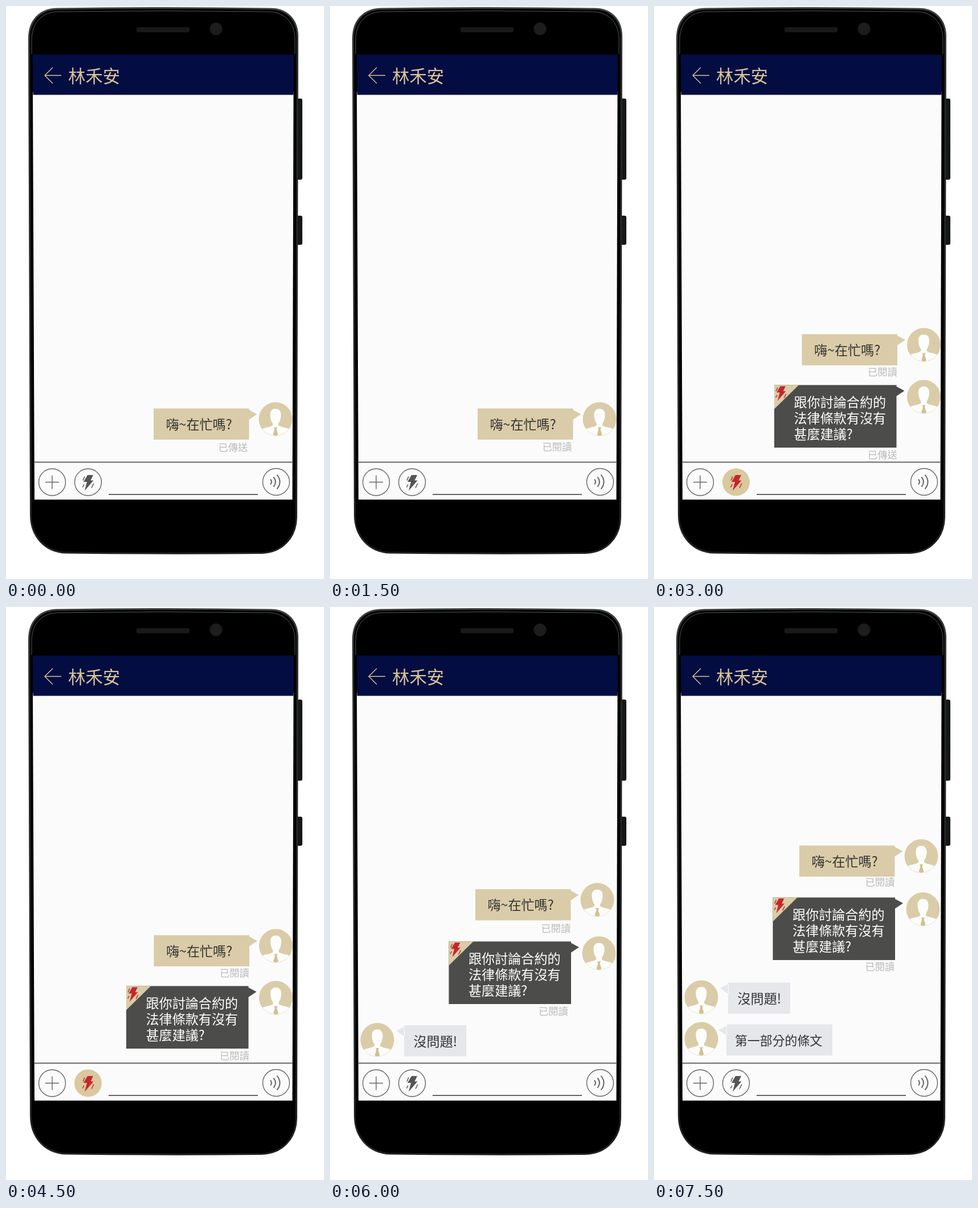
Animation of 558 by 1003 pixels, one loop 8000 ms. Source, as an HTML page:

```html
<!DOCTYPE html>
<html lang="zh-Hant">
<head>
<meta charset="utf-8">
<title>Chat</title>
<style>
  html, body { margin: 0; width: 100%; height: 100%; overflow: hidden; background: #fff; }
  svg { display: block; width: 558px; height: 1003px; }
  text { font-family: "Noto Sans CJK TC", "Noto Sans CJK", "Noto Sans CJK JP", sans-serif; font-size: 23.1px; fill: #333; }
  .title { font-size: 30.4px; fill: #d8c394; }
  .status { font-size: 17.3px; fill: #b9b9b9; }
  .light { fill: #fff; }
  .line { fill: none; stroke: #666; stroke-width: 1.4; }
</style>
</head>
<body>
<svg viewBox="0 0 558 1003">
  <defs>
    <linearGradient id="rim" x2="0" y2="1">
      <stop offset="0" stop-color="#3c4040"/>
      <stop offset=".12" stop-color="#272a2a"/>
      <stop offset="1" stop-color="#202222"/>
    </linearGradient>
    <clipPath id="round"><circle r="29"/></clipPath>
    <g id="avatar">
      <circle r="29.5" fill="#dacca8"/>
      <g clip-path="url(#round)">
        <path fill="#fdfdfc" d="M0-18C7-18 10-13 9.500-6C9 1 7 5 5 8V11C8 14 20 15 25 18L31 31H-31L-25 18C-20 15-8 14-5 11V8C-7 5-9 1-9.500-6C-10-13-7-18 0-18Z"/>
        <path fill="#d3c090" d="M-3 14.500H3L1.600 18.500L4.500 27L0 31L-4.500 27L-1.600 18.500Z"/>
      </g>
    </g>
    <g id="bolt">
      <path d="M-1-12.500H9L4.500-3H9.500L-6 15L-2-.5H-8Z"/>
      <path fill="none" stroke="currentColor" stroke-width="1.5" d="M-6-10L-9-3M10 2L6 10M-7 4L-9.500 9"/>
    </g>
  </defs>

  <path fill="#161717" d="M508 162H517Q520 162 520 165V301Q520 304 517 304H508ZM508 367H517Q520 367 520 370V415Q520 418 517 418H508Z"/>
  <path fill="#000" stroke="url(#rim)" stroke-width="3" d="M88 5Q276 2 464 5C492 5 511 23 511.500 52L509.500 895C509 931 484 957 448 957.500Q276 959 106 957C68 956 44 928 43.500 892L40.500 58C40 26 59 6 88 5Z"/>
  <path fill="none" stroke="#555959" d="M45 84V60C45 30 62 11 90 10Q276 7 462 10C489 11 506 29 507 56V84"/>
  <rect x="229" y="37" width="93" height="9" rx="3" fill="#191919"/>
  <circle cx="368.500" cy="40" r="11" fill="#1d1d1d"/>

  <path fill="#fbfbfb" d="M47 150H504.500L502.500 864H50Z"/>
  <path fill="#030d42" d="M47 85H504.500V155.500H47.500Z"/>
  <path class="line" style="stroke:#d8c394" d="M97 121.500H68M82 107.500L68 121.500L82 135.500"/>
  <text class="title" x="109" y="133.500">林禾安</text>

  <g id="chat"></g>

  <path class="line" style="stroke-width:2" d="M50 798.500H502.500M180 855H442"/>
  <g class="line">
    <circle cx="81" cy="833.500" r="23.500"/>
    <path d="M69 833.500H93M81 821.500V845.500"/>
    <circle cx="474" cy="833" r="23.500"/>
    <path stroke-width="2" d="M464 828.500Q468 833 464 837.500M469.500 824.500Q476.500 833 469.500 841.500M475.500 820.500Q485.500 833 475.500 845.500"/>
  </g>
  <g id="flash"></g>
</svg>
<script>
const tan = '#dacca8', dark = '#4c4c4a', grey = '#e6e7eb', red = '#c4272b';
const SENT = '已傳送', READ = '已閱讀';

const avatar = (x, y) => `<use href="#avatar" x="${x}" y="${y}"/>`;
const text = (x, y, s, attrs = '') => `<text x="${x}" y="${y}" ${attrs}>${s}</text>`;
const status = (x, y, s) => text(x, y + 6.6, s, 'class="status"');
const bolt = (x, y, color, scale = 1) =>
  `<use href="#bolt" transform="translate(${x} ${y}) scale(${scale})" fill="${color}" color="${color}"/>`;

// Bubble with its tail on the right (side 1) or on the left (side -1)
function bubble(x, y, w, h, color, side) {
  const edge = side > 0 ? x + w : x;
  return `<path fill="${color}" d="M${x} ${y}h${w}v${h}h${-w}z
    M${edge - side} ${y + 2}L${edge + 14 * side} ${y + 10}L${edge - side} ${y + 20}z"/>`;
}

const greeting = (x, y, avatarX) =>
  bubble(x, y, 167.5, 54.5, tan, 1) + avatar(avatarX, y + 18.5) + text(x + 21.5, y + 36, '嗨~在忙嗎?');

const question = (x, y, avatarX) =>
  bubble(x, y, 214.5, 109.5, dark, 1) + avatar(avatarX, y + 20.5) +
  `<path fill="${tan}" d="M${x} ${y}h43l-43 42z"/>` + bolt(x + 11.5, y + 13.5, red, .93) +
  ['跟你討論合約的', '法律條款有沒有', '甚麼建議?']
    .map((s, i) => text(x + 34.5, y + 38 + 28 * i, s, 'class="light"')).join('');

const reply = (x, y, w, s, textX, size) =>
  bubble(x, y, w, 54.5, grey, -1) + avatar(83, y + 25.5) +
  text(textX, y + 36.5, s, `style="font-size:${size}px"`);

const opening = s => greeting(259, 704.5, 473) + status(372.5, s === SENT ? 772 : 771, s);
const asked = s => greeting(259.5, 574.5, 473.5) + status(375, 640, READ) +
  question(211, 663.5, 473.5) + status(375, 785, s);
const agreed = y => reply(130, y, 109, '沒問題!', 146.5, 23.1);

const scenes = [
  opening(SENT),
  opening(READ),
  asked(SENT),
  asked(READ),
  greeting(255, 494, 469) + status(370.5, 562, READ) +
    question(208.5, 585.5, 472) + status(366, 707, READ) + agreed(732),
  greeting(255, 417.5, 469) + status(370.5, 481.5, READ) +
    question(208.5, 508.5, 472) + status(370.5, 629, READ) + agreed(657.5) +
    reply(127, 730.5, 186, '第一部分的條文', 142, 21.9)
];

const flash = on => (on
  ? `<circle cx="144" cy="833.5" r="24" fill="#dac89f"/>`
  : `<circle class="line" cx="144" cy="833.5" r="23.5"/>`) + bolt(144, 833.5, on ? red : '#555');

const chatLayer = document.getElementById('chat');
const flashLayer = document.getElementById('flash');
let shown = -1;

function draw() {
  const scene = Math.floor(performance.now() % 8000 / 1500);
  if (scene !== shown) {
    shown = scene;
    chatLayer.innerHTML = scenes[scene];
    flashLayer.innerHTML = flash(scene === 2 || scene === 3);
  }
  requestAnimationFrame(draw);
}
draw();
</script>
</body>
</html>
```
